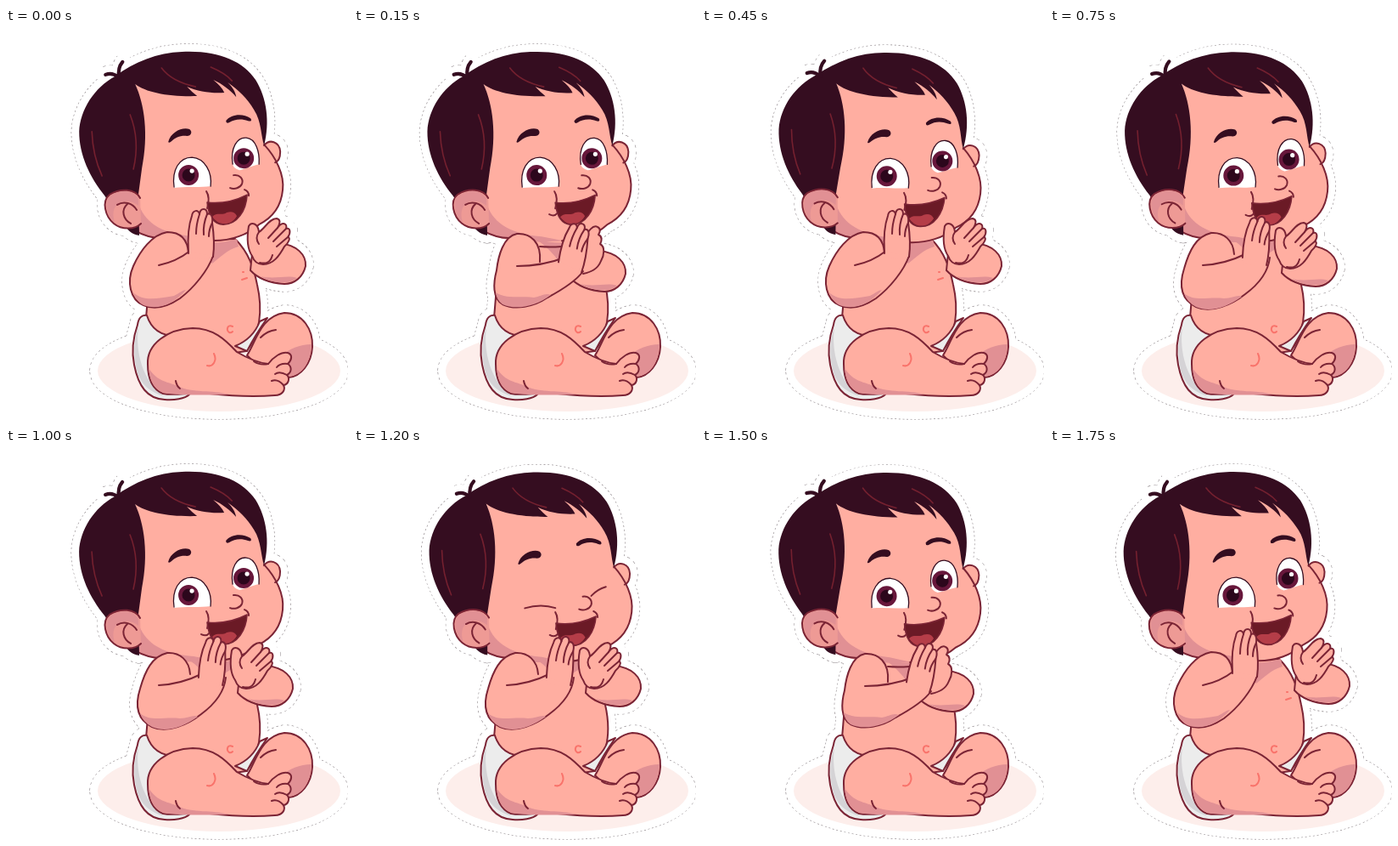
Recreate the animation shown at these times as an HTML page. Size 403 by 461 pixels, loop 1.85 s.

```html
<!DOCTYPE html>
<html lang="en">
<head>
<meta charset="utf-8">
<title>Clapping baby</title>
<style>
html, body { margin: 0; width: 100%; height: 100%; overflow: hidden; background: #fff; }
svg { display: block; width: 403px; height: 461px; }
path { stroke-linecap: round; stroke-linejoin: round; }
.edge path { fill: none; stroke: #8c8488; stroke-width: 19.2; stroke-dasharray: 2 2.5; stroke-linecap: butt; }
.halo path { fill: #fff; stroke: #fff; stroke-width: 18.2; }
.skin { fill: #ffaea1; stroke: #7b2435; stroke-width: 2; }
.flat { fill: #ffaea1; }
.ear { fill: #ee9a95; stroke: #7b2435; stroke-width: 2; }
.line { fill: none; stroke: #7b2435; stroke-width: 2; }
.shade { fill: #e19094; }
.hair { fill: #350d20; }
.strand { fill: none; stroke: #350d20; stroke-width: 4.2; }
.glint { fill: none; stroke: #74202f; stroke-width: 1.6; }
.red { fill: none; stroke: #f9736b; stroke-width: 2; }
.cloth { fill: #ececec; stroke: #7b2435; stroke-width: 2; }
.fold { fill: #d5d3d6; }
.white { fill: #fff; }
.lid { fill: none; stroke: #350d20; stroke-width: 1.3; }
.mouth { fill: #6b1a26; stroke: #7b2435; stroke-width: 1.6; }
.tongue { fill: #b53d48; }
</style>
</head>
<body>
<svg viewBox="0 0 403 461" id="stage"></svg>
<script>
const path = (kind, d) => `<path class="${kind}" d="${d}"/>`;
const group = (kind, body, move = '') => `<g class="${kind}" transform="${move}">${body}</g>`;
const dot = (x, y, r, fill) => `<circle cx="${x}" cy="${y}" r="${r}" fill="${fill}"/>`;

const ground = 'M108 403A143 48 0 0 1 394 403A143 48 0 0 1 108 403Z';
const torso = 'M180 250C165 290 168 330 163 355L200 392L283 380C299 362 303 332 296 302C292 282 286 264 270 248Z';
const diaper = 'M166 338C160 337 156 341 155 349C149 366 148 381 151 396C156 421 166 436 187 437C198 438 211 436 216 431L205 362Q174 364 166 338Z';
const nearLeg = 'M167 395C166 372 190 354 220 353C244 353 258 366 272 381C284 388 298 394 309 395C315 387 325 380 332 382C338 384 337 390 332 395C337 398 337 405 331 408C335 412 333 419 327 420C330 426 325 432 317 432C290 434 268 433 240 430C215 428 200 433 185 430C170 424 167 408 167 395Z';
const farLeg = 'M284 385C295 368 300 339 328 335C350 335 362 355 361 375C360 395 347 410 333 411L300 400Z';
const hair = 'M157 244C147 242 144 238 140 232L116 197C99 176 86 150 86 122C87 96 104 70 128 57C151 40 178 29 207 28C249 26 278 38 294 61C307 82 311 110 304 138C300 126 301 110 292 96C284 83 274 73 261 64C267 70 270 75 271 81C264 73 255 66 244 61C250 66 255 71 257 76C242 77 226 75 213 69C217 73 221 77 225 80C192 81 165 76 152 66C163 90 168 125 160 165L156 195Z';
const face = 'M152 66L200 45L268 45L296 80C303 115 302 130 305 138C318 152 328 172 326 190C324 212 312 224 298 231C285 243 265 250 245 250C218 250 180 254 153 238L148 190C166 150 164 95 152 66Z';
const ear = 'M158 200C152 189 135 188 122 196C112 204 117 222 127 230C137 238 152 237 159 230';
const farEar = 'M304 138C310 130 322 133 323 145C323 153 320 157 317 158';
const farArm = 'M322 253C343 255 354 267 353 280C350 293 340 301 328 301C312 300 298 296 288 285L290 265';
const farHand = 'M290 268C283 258 284 245 286 233C289 228 297 229 298 240C305 236 310 224 319 224C324 225 323 230 320 235C326 227 332 230 330 236C335 234 336 241 332 246C336 246 333 253 328 257C322 268 315 278 303 278C296 278 292 274 290 268Z';
const nearHand = 'M-17 50C-18 35 -18 22 -13 8C-12 1 -5 0 -4 6C-3 -2 5 -2 5 6C9 4 12 8 11 16C13 30 14 42 12 56';

// Clapping poses: apart, close, together
const poses = [
  {
    arm: 'M215 265C214 248 205 240 190 240C172 243 158 262 150 280C142 298 146 320 162 326C175 332 190 328 205 318C222 305 238 285 244 268',
    shade: 'M150 311C162 322 178 318 198 315C204 312 208 308 212 308C197 326 178 332 162 326Q154 322 150 311Z',
    crease: 'M180 279C195 276 208 269 217 262',
    hand: 'translate(232 213)', far: 'translate(0 0)', palm: 'translate(0 0)',
    chest: 'M278 296L284 294M279 287L280 287'
  },
  {
    arm: 'M217 266C216 250 205 240 190 241C172 245 164 262 158 283C151 305 156 320 172 328C190 336 215 325 230 313C245 302 257 288 259 270',
    shade: 'M158 312C170 322 185 316 205 318C215 318 221 313 226 316C208 329 188 335 172 328Q161 322 158 312Z',
    crease: 'M180 279C200 278 218 272 232 265',
    hand: 'translate(249 222) rotate(6)', far: 'translate(-15 3)', palm: 'translate(-20 5)',
    chest: 'M279 293L284 297'
  },
  {
    arm: 'M219 275C221 252 208 241 192 242C176 245 170 268 168 285C164 300 163 318 175 325C190 332 212 328 228 317C245 308 262 297 270 286',
    shade: 'M167 311C179 319 195 315 212 317C220 316 225 311 232 314C214 328 190 332 175 325Q168 320 167 311Z',
    crease: 'M192 280C215 280 235 275 248 270M219 257Q230 258 245 257',
    hand: 'translate(268 230) rotate(12)', far: 'translate(-33 9)', palm: '', chest: ''
  }
];

const silhouette = () =>
  [ground, torso, diaper, nearLeg, farLeg].map(d => path('', d)).join('') +
  group('head', [hair, face, ear, farEar, 'M134 57Q132 46 138 39M132 57Q124 51 116 55'].map(d => path('', d)).join('')) +
  poses.map((p, i) => group('pose' + i,
    path('', p.arm) + group('', path('', nearHand), p.hand) +
    group('', path('', farArm), p.far) +
    (p.palm ? group('', path('', farHand), p.palm) : ''))).join('');

const eye = (shape, lid, x, y) =>
  path('white', shape) + dot(x, y, 12, '#67173b') + dot(x, y, 7.5, '#2c071c') +
  dot(x + 4, y - 5, 2.6, '#fff') + path('lid', lid);

const head =
  path('flat', face) +
  path('shade', 'M156 206C162 226 180 242 221 245L247 250C215 252 178 254 153 239Z') +
  path('skin', farEar) +
  path('line', 'M304 137C318 152 328 172 326 190C324 212 312 224 298 231C285 243 265 250 245 250M183 247Q167 247 153 239') +
  path('hair', hair) +
  path('strand', 'M133 58Q131 47 137 40M132 58Q125 52 117 55') +
  path('glint', 'M101 122Q102 150 113 174M146 102Q158 132 150 166M183 47Q195 63 223 69M241 46Q258 53 266 62') +
  path('ear', ear) +
  path('shade', 'M156 201C150 190 136 190 123 197C115 204 119 221 128 229Q122 209 138 204Q149 203 156 209Z') +
  path('line', 'M131 208C139 203 149 206 154 214M143 207C135 214 138 225 147 230') +
  group('brows',
    path('hair', 'M191 134C194 122 208 116 216 119C220 122 218 127 213 127C206 126 199 129 195 133Q192 136 191 134Z') +
    path('hair', 'M259 109C265 101 279 100 288 106C290 109 288 110 285 109C277 106 269 107 263 111Q259 113 259 109Z')) +
  group('open',
    eye('M198 188C195 167 204 152 219 152C234 153 243 169 241 186C228 188 212 186 198 188Z',
      'M198 187C195 167 204 152 219 152C234 153 243 169 241 186', 215, 173) +
    eye('M267 160C264 141 272 128 283 129C294 130 299 145 298 160C290 162 280 166 275 167Q268 165 267 160Z',
      'M267 160C264 141 272 128 283 129C294 130 299 145 298 160', 280, 153)) +
  group('shut', path('line', 'M200 188C212 184 226 184 236 187M278 172Q285 164 295 161')) +
  path('line', 'M268 173C275 172 280 177 278 183C276 188 269 190 264 188') +
  path('line', 'M236 192C240 198 239 205 237 212M230 219Q236 222 239 218M281 190Q286 192 286 197') +
  path('mouth', 'M237 205C253 207 270 203 284 196C283 214 273 231 256 231C246 231 239 223 237 205Z') +
  path('tongue', 'M243 222C248 216 255 221 260 217C266 215 270 217 272 221C267 229 262 230 255 230Q248 229 243 222Z');

const arms = poses.map((p, i) => group('pose' + i,
  path('red', p.chest) +
  group('', path('skin', farArm) +
    path('shade', 'M300 292C317 296 331 290 343 294C334 302 315 301 300 292Z'), p.far) +
  (p.palm
    ? group('', path('skin', farHand) +
        path('line', 'M320 235L309 247M330 236L315 251M332 246L319 257M298 240Q293 247 298 254M299 276Q311 279 314 267'), p.palm)
    : path('skin', 'M270 250C276 238 282 231 287 234C291 236 290 240 288 243C293 245 292 251 290 254C296 257 295 267 291 274C287 284 279 287 270 289')) +
  path('skin', p.arm) + path('shade', p.shade) + path('line', p.crease) +
  group('', path('flat', 'M-16 50L-16 57L6 59L12 54Z') + path('skin', nearHand) +
    path('line', 'M-4 6Q-8 18 -8 29M5 6Q0 18 1 30M11 16Q7 24 7 32'), p.hand)
)).join('');

const body =
  path('skin', torso) +
  path('shade', 'M214 248C235 254 252 254 272 248L274 257C260 261 252 270 243 277Q232 260 214 248Z') +
  path('red', 'M267 351C261 348 259 355 263 358Q265 359 267 357') +
  path('cloth', diaper) +
  path('fold', 'M156 352C152 380 161 416 186 433Q160 426 154 402Q148 374 156 352Z') +
  path('cloth', 'M299 345L308 341C300 352 292 364 284 380L270 374C285 368 294 358 299 345Z') +
  path('skin', farLeg) +
  path('shade', 'M360 372C346 372 333 378 327 384C336 381 338 388 332 395C337 399 336 405 332 408L333 410C350 408 359 393 360 372Z') +
  path('line', 'M300 364Q308 356 318 355') +
  path('skin', nearLeg) +
  path('shade', 'M168 400C179 417 192 416 202 421C220 430 243 425 262 431C235 432 203 432 185 429Q170 423 168 400Z') +
  path('line', 'M200 415Q201 421 205 424M332 395Q323 394 319 399M331 408Q322 403 317 407M327 420Q320 412 313 415M309 395Q299 397 292 392') +
  path('red', 'M245 383C249 391 244 399 237 397');

const stage = document.getElementById('stage');
stage.innerHTML =
  group('edge', silhouette()) + group('halo', silhouette()) +
  `<path fill="#fdeeeb" d="${ground}"/>` + body + group('head', head) + arms;

const all = name => stage.querySelectorAll('g.' + name);
const show = (name, on) => all(name).forEach(el => el.style.display = on ? '' : 'none');
const clap = [0, 1, 1, 2, 2, 1, 1, 0, 0];

function draw(ms) {
  const step = Math.min(35, Math.floor(ms % 1850 / 50));
  const nod = step % 18;
  const tilt = 1 - Math.cos((nod - 1.2) * Math.PI / 9);
  all('head').forEach(el => el.setAttribute('transform', `rotate(${tilt.toFixed(3)} 180 255)`));
  const pose = clap[step % 9];
  poses.forEach((_, i) => show('pose' + i, i === pose));
  const blink = nod >= 4 && nod <= 7;
  show('open', !blink);
  show('shut', blink);
  all('brows')[0].setAttribute('transform', `translate(0 ${blink ? 2 : 0})`);
}

const start = performance.now();
function tick() {
  draw(performance.now() - start);
  requestAnimationFrame(tick);
}
tick();
</script>
</body>
</html>
```
